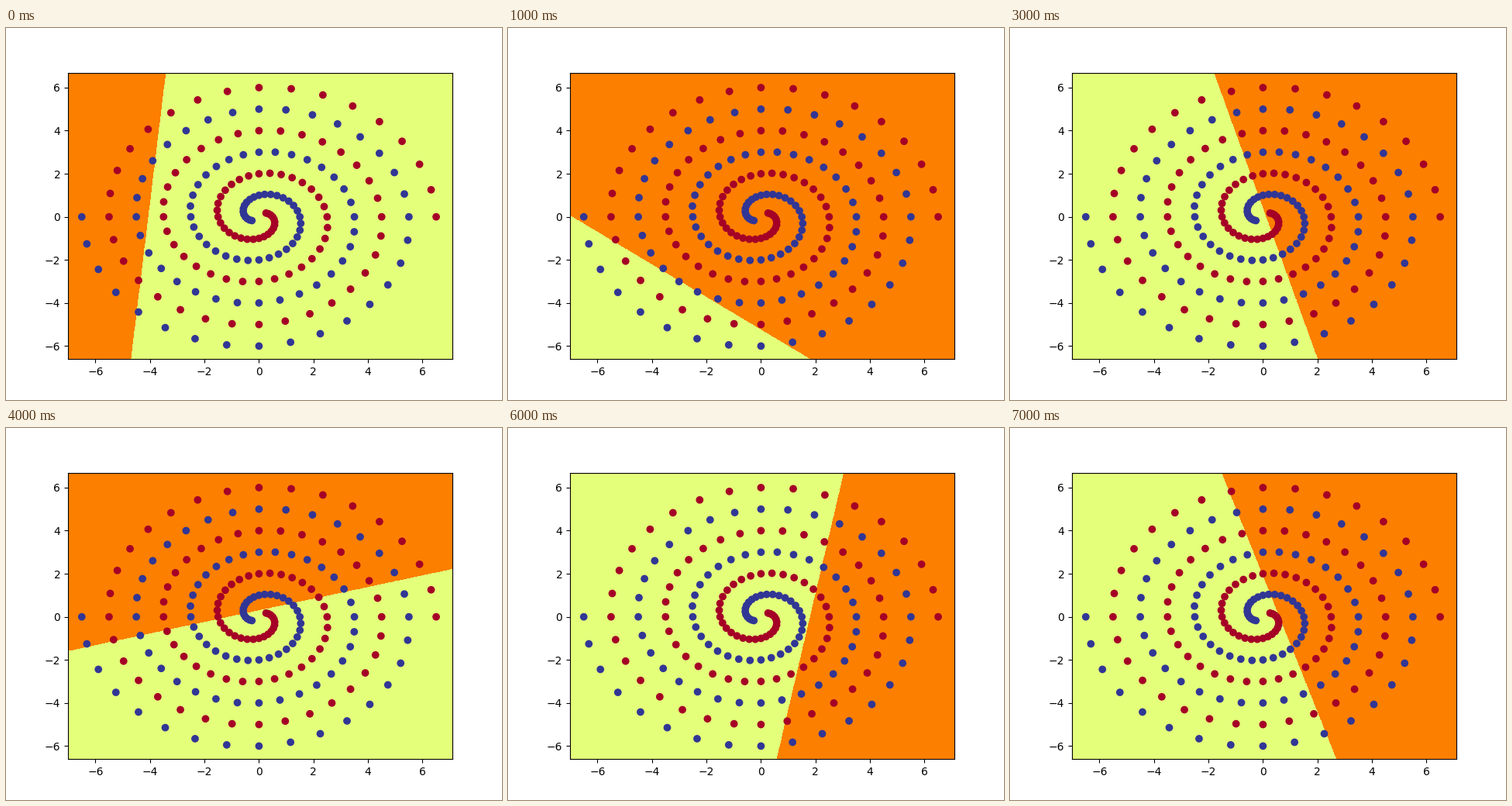
A matplotlib script for the animation above (8000 ms loop, 640 by 480 pixels).

```python
import numpy as np
import matplotlib.pyplot as plt
from matplotlib.animation import FuncAnimation

STEP = 0.01
POINTS = 100

# One linear unit per second: direction it points in (degrees) and threshold.
ANGLES = [174.5, 52.9, 14.7, 16.0, 105.1, 144.6, -10.5, 17.6]
THRESHOLDS = [4.04, -4.18, -2.16, 0.11, 0.28, -0.17, 1.77, 0.57]

xs = np.arange(-7, 7.095, STEP)
ys = np.arange(-6.6, 6.695, STEP)


def activation(unit):
    """Boolean map of where the unit fires over the grid."""
    a = np.radians(ANGLES[unit])
    return xs * np.cos(a) + ys[:, None] * np.sin(a) > THRESHOLDS[unit]


def spiral():
    i = np.arange(POINTS)
    radius = 6.5 * (1 - i / 104)
    angle = i * np.pi / 16
    return np.array([radius * np.cos(angle), radius * np.sin(angle)])


fig, ax = plt.subplots(figsize=(6.4, 4.8), dpi=100)
half = STEP / 2
extent = (xs[0] - half, xs[-1] + half, ys[0] - half, ys[-1] + half)
region = ax.imshow(
    activation(0).astype(float), cmap="Wistia", vmin=0, vmax=1,
    origin="lower", aspect="auto", interpolation="nearest", extent=extent,
)

arm = spiral()
ax.scatter(*np.hstack([arm, -arm]), c=np.repeat([0, 1], POINTS), cmap="RdYlBu")
ax.set(xlim=extent[:2], ylim=extent[2:])


def update(frame):
    region.set_data(activation(frame).astype(float))
    return [region]


anim = FuncAnimation(fig, update, frames=len(ANGLES), interval=1000, repeat=True)
plt.show()
```
